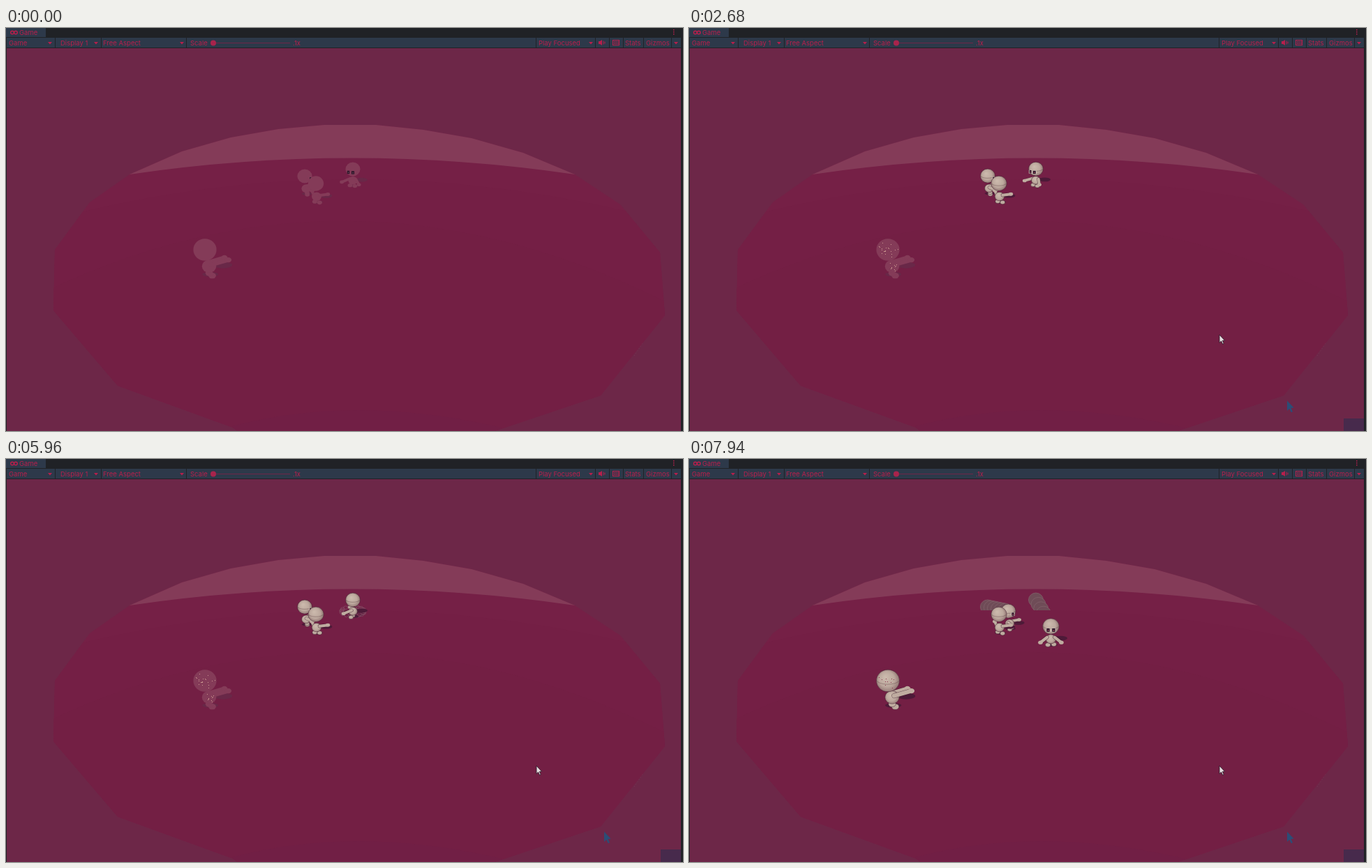
Write an HTML page with a canvas that moves like this. It is 970 by 578 pixels and loops after 8 s.

```html
<!DOCTYPE html>
<html lang="en">
<head>
<meta charset="utf-8">
<title>Game view</title>
<style>
  html, body { margin: 0; width: 100%; height: 100%; overflow: hidden; background: #6d2748; }
  canvas { display: block; }
</style>
</head>
<body>
<canvas id="stage" width="970" height="578"></canvas>
<script>
const ctx = document.getElementById('stage').getContext('2d');
const LOOP = 8000, WALK_START = 7200, SHADED_FROM = 70;
const PINK = '#b81f4c', DARK = '#202226', BAR = '#2d394a', FLAT = '#843b58';
const { sin, cos, PI, min, max } = Math;

const random = n => { const v = sin(n * 12.9898) * 43758.5453; return v - Math.floor(v); };

// Piecewise eased interpolation through [time, value] keys.
function along(keys, t) {
  if (t <= keys[0][0]) return keys[0][1];
  for (let i = 1; i < keys.length; i++) {
    const [t0, a] = keys[i - 1], [t1, b] = keys[i];
    if (t <= t1) { const u = (t - t0) / (t1 - t0); return a + (b - a) * u * u * (3 - 2 * u); }
  }
  return keys[keys.length - 1][1];
}

function rect(x, y, w, h, color) { ctx.fillStyle = color; ctx.fillRect(x, y, w, h); }

function polygon(points, color) {
  ctx.beginPath();
  points.forEach(([x, y]) => ctx.lineTo(x, y));
  ctx.closePath();
  ctx.fillStyle = color;
  ctx.fill();
}

function oval(x, y, rx, ry, fill, outline) {
  ctx.beginPath();
  ctx.ellipse(x, y, rx, ry, 0, 0, 2 * PI);
  if (fill) { ctx.fillStyle = fill; ctx.fill(); }
  if (outline) { ctx.strokeStyle = outline; ctx.lineWidth = 0.7; ctx.stroke(); }
}

function line(x0, y0, x1, y1, width, color) {
  ctx.beginPath();
  ctx.moveTo(x0, y0);
  ctx.lineTo(x1, y1);
  ctx.lineWidth = width;
  ctx.strokeStyle = color;
  ctx.stroke();
}

function label(text, x, y, color = PINK, font = '9.5px Inter, sans-serif') {
  ctx.font = font;
  ctx.fillStyle = color;
  ctx.fillText(text, x, y);
}

function drawToolbar() {
  rect(0, 0, 970, 29, DARK);
  rect(0, 0, 57, 13, BAR);
  rect(1, 14, 966, 14, BAR);
  for (const x of [70, 136, 258, 759, 844, 864, 884, 913, 953]) rect(x, 14, 1, 14, DARK);
  for (const x of [63, 129, 252, 838, 960]) polygon([[x - 3, 20], [x + 3, 20], [x, 23.5]], PINK);

  ctx.lineWidth = 1.4;
  ctx.strokeStyle = PINK;
  for (const x of [9, 14]) { ctx.beginPath(); ctx.arc(x, 6.5, 2.3, 0, 2 * PI); ctx.stroke(); }
  label('Game', 19, 10);
  label('Game', 4, 24.5);
  label('Display 1', 78, 24.5);
  label('Free Aspect', 139, 24.5);
  label('Scale', 264, 24.5);
  line(297, 21.5, 407, 21.5, 1, '#6e2648');
  oval(297, 21.5, 4, 4, '#a8244c');
  label('.1x', 411, 24.5);
  label('Play Focused', 763, 24.5);
  label('Stats', 887, 24.5);
  label('Gizmos', 917, 24.5);
  for (const y of [2, 5, 8]) rect(956, y, 1.5, 1.5, PINK);

  polygon([[849, 19], [851, 19], [854, 17], [854, 25], [851, 23], [849, 23]], PINK);
  line(856, 18.5, 856, 23.5, 1, PINK);
  line(858, 19.5, 858, 22.5, 1, PINK);
  ctx.lineWidth = 1;
  ctx.strokeRect(869.5, 17.5, 9, 7);
  for (let i = 0; i < 6; i++) rect(871 + i % 3 * 2.5, 19 + (i > 2) * 2.5, 1.5, 1.5, PINK);
}

function drawDome() {
  rect(0, 29, 970, 549, '#6d2748');
  const rim = [[177, 210], [252, 177], [322, 157], [390, 145], [456, 139], [530, 139],
    [598, 146], [667, 158], [741, 179], [815, 210]];
  const floor = [[880, 253], [937, 322], [944, 412], [852, 527], [718, 572],
    [700, 578], [332, 578], [325, 573], [160, 513], [68, 405], [70, 318], [120, 250]];
  polygon([...rim, ...floor], '#752046');
  polygon(rim, FLAT);

  ctx.save();
  ctx.beginPath();
  [...rim, ...floor].forEach(([x, y]) => ctx.lineTo(x, y));
  ctx.clip();
  const band = (left, peak, right, color) => {
    ctx.beginPath();
    ctx.moveTo(left[0], 578);
    ctx.lineTo(left[0], left[1]);
    ctx.quadraticCurveTo(495, 2 * peak - (left[1] + right[1]) / 2, right[0], right[1]);
    ctx.lineTo(right[0], 578);
    ctx.fillStyle = color;
    ctx.fill();
  };
  band([177, 210], 186.5, [815, 210], '#752046');
  band([60, 276], 217, [944, 276], '#741f45');
  band([60, 376], 277, [944, 392], '#731f44');
  band([300, 578], 548, [730, 578], '#711f45');
  ctx.restore();

  ctx.setLineDash([1, 3]);
  line(900, 470, 912, 452, 0.6, '#85435f');
  ctx.setLineDash([]);
  rect(0, 29, 1, 549, DARK);
  rect(967, 29, 3, 549, DARK);
}

// Yaw 0 faces the viewer, positive turns toward the right of the screen.
function armLine(d, side) {
  const turn = d.yaw + side * d.spread;
  const x = d.x + d.lean + side * 0.45 * d.r * cos(d.yaw);
  const y = d.y + (d.stature - 0.22) * d.r - side * 0.1 * d.r * sin(d.yaw);
  return {
    x, y,
    handX: x + d.reach * d.r * sin(turn),
    handY: y + d.reach * d.r * (0.45 * cos(turn) + d.drop),
    inFront: -side * sin(d.yaw) + 0.3 * cos(turn) > 0
  };
}

function drawArm(d, side, skin, edge) {
  const a = armLine(d, side);
  ctx.lineCap = 'round';
  if (edge) line(a.x, a.y, a.handX, a.handY, 0.36 * d.r + 1, edge);
  line(a.x, a.y, a.handX, a.handY, 0.36 * d.r, skin);
  ctx.lineCap = 'butt';
  oval(a.handX, a.handY, 0.28 * d.r, 0.22 * d.r, skin);
}

function drawEyes(d) {
  for (const side of [-1, 1]) {
    const a = d.yaw + side * 0.4, facing = cos(a);
    if (facing < 0.25) continue;
    const w = d.r * (0.16 + 0.24 * facing), h = 0.42 * d.r;
    const x = d.x + 0.86 * d.r * sin(a) - w / 2, y = d.y + d.r * (0.1 + 0.16 * facing);
    if (!d.flat) rect(x - 0.8, y - 0.3, w + 1.6, h + 0.6, '#dccbc2');
    rect(x, y, w, h, '#2b1729');
    rect(x + w * 0.35, y + h * 0.4, w * 0.35, h * 0.35, d.flat ? '#6d4058' : '#a8475f');
  }
}

function drawDoll(d) {
  const { x, y, r, flat } = d;
  const edge = flat ? null : 'rgba(58,25,42,.65)';
  const bodyX = x + d.lean, bodyY = y + d.stature * r, feetY = y + (d.stature + 0.7) * r;
  const shade = (cx, cy, size) => {
    if (flat) return FLAT;
    const g = ctx.createRadialGradient(cx - 0.25 * size, cy - 0.35 * size, 0, cx, cy, size * 1.1);
    g.addColorStop(0, '#cdbbae');
    g.addColorStop(0.6, '#bca89d');
    g.addColorStop(1, '#8a6c6b');
    return g;
  };
  const limb = flat ? FLAT : '#bfaca0';
  const shadow = flat ? '#692848' : '#4d1a38';

  oval(bodyX + 1.2 * r, feetY - 0.8 * r, 0.8 * r, 0.28 * r, shadow);
  oval(bodyX + 0.1 * r, feetY, 0.7 * r, 0.2 * r, shadow);
  for (const side of [-1, 1]) if (!armLine(d, side).inFront) drawArm(d, side, limb, edge);
  for (const side of [-1, 1]) {
    const lift = max(0, side * d.step) * 0.16 * r;
    oval(bodyX + r * (side * 0.36 * cos(d.yaw) + 0.15 * sin(d.yaw)),
      feetY - lift - side * 0.12 * r * sin(d.yaw), 0.32 * r, 0.25 * r, limb, edge);
  }
  oval(bodyX, bodyY, 0.62 * r, 0.56 * r, shade(bodyX, bodyY, 0.62 * r), edge);
  for (const side of [-1, 1]) if (armLine(d, side).inFront) drawArm(d, side, limb, edge);
  oval(x, y, r, 0.95 * r, shade(x, y, r), edge);
  if (!flat) {
    ctx.beginPath();
    ctx.ellipse(x, y - 0.05 * r, 0.96 * r, 0.36 * r, 0, 0.1, PI - 0.1);
    ctx.lineWidth = 0.7;
    ctx.strokeStyle = 'rgba(80,50,55,.5)';
    ctx.stroke();
  }
  drawEyes(d);
}

function drawSpecks(d, count, color, bodyToo) {
  for (let i = 0; i < count; i++) {
    const onBody = bodyToo && i % 3 === 0;
    const a = random(i + 1) * 2 * PI, q = Math.sqrt(random(i + 60)) * 0.9 * d.r * (onBody ? 0.6 : 1);
    rect(Math.round(d.x + (onBody ? d.lean : 0) + q * cos(a)),
      Math.round(d.y + (onBody ? d.stature * d.r : 0) + q * sin(a)), 1, 1, color);
  }
}

// Leftover arm outlines at the angles the turning doll has passed.
function drawTurnTrail(d) {
  for (let yaw = -0.9; yaw < d.yaw - 0.4; yaw += 0.42)
    for (const side of [-1, 1]) {
      const a = armLine({ ...d, yaw }, side);
      line(a.x, a.y + 3, a.handX, a.handY + 3, 1.2, '#5c2141');
      oval(a.handX, a.handY, 3, 2.4, null, '#865267');
    }
}

function drawWalkTrail(x, y, r, dx, dy, walk) {
  ctx.save();
  ctx.beginPath();
  ctx.rect(400, 180, 140, 37);
  ctx.clip();
  for (let k = 0; k < walk; k += 0.17)
    oval(x + dx * k, y + dy * k, r, 0.95 * r, '#6f4c57', '#85636c');
  ctx.restore();
}

function drawPointer(x, y, scale, fill, outline) {
  ctx.save();
  ctx.translate(x, y);
  ctx.scale(scale, scale);
  polygon([[0, 0], [0, 12], [2.7, 9.6], [4.8, 14], [6.6, 13.1], [4.6, 8.8], [8, 8.6]], fill);
  if (outline) { ctx.strokeStyle = outline; ctx.lineWidth = 0.9; ctx.stroke(); }
  ctx.restore();
}

const yawKeys = [[0, -0.4], [900, -0.3], [1860, -0.4], [3510, -0.9], [4170, 0.7],
  [4700, 0.85], [5960, 4.36], [6650, 2 * PI], [8000, 2 * PI]];
const pointerX = [[1000, 958], [1330, 857], [1650, 760]];
const pointerY = [[1000, 570], [1330, 535], [1650, 451], [1950, 451], [2300, 440]];

function drawDolls(t) {
  const flat = t < SHADED_FROM;
  const walk = max(0, min(1, (t - WALK_START) / (7940 - WALK_START)));
  const step = sin(t / 170);
  const bob = flat ? 0 : sin(t / 260) * 0.5;
  const base = { lean: 1, stature: 1.68, spread: 0.75, reach: 1.2, drop: 0, flat, step };

  const spinner = { ...base, x: 497 + 21.5 * walk, y: 202.5 + 37.5 * walk + bob * (1 - walk), r: 10.5 + 1.3 * walk,
    lean: 0, stature: 1.55, drop: 0.2, yaw: along(yawKeys, t), step: walk ? step : 0 };
  const rear = { ...base, x: 428 + 29.5 * walk, y: 212.5 + 6 * walk + bob, r: 10.6, lean: 2,
    yaw: 1.6 - 0.4 * walk };
  const front = { ...base, x: 444, y: 223 + bob * 0.6, r: 11.2, yaw: 2.6, reach: 1.1 };
  const near = { ...base, x: 285, y: 318, r: 16.6, lean: 6, stature: 1.43, spread: 0, reach: 1.6,
    drop: -0.1, yaw: 1.95, flat: t < WALK_START, step: 0 };

  if (walk) {
    drawWalkTrail(497, 202, 10.5, 21.5, 37.5, walk);
    drawWalkTrail(428, 212, 10.6, 29.5, 6, walk);
  } else if (!flat) drawTurnTrail(spinner);
  drawDoll(spinner);
  drawDoll(rear);
  drawDoll(front);
  drawDoll(near);
  if (!near.flat) drawSpecks(near, 10, '#8c3450', false);
  else if (!flat) drawSpecks(near, 30, '#c9968f', true);
}

function drawOverlay(t) {
  if (t < 1000) return;
  if (t < 2100) {
    rect(939, 561, 28, 17, '#85808c');
    rect(940, 562, 27, 16, '#bcb5c0');
    label('Stop', 944, 577, '#25232b', '10.5px "Open Sans", sans-serif');
  } else rect(938, 560, 29, 18, '#472a4c');
  if (t > 1330) drawPointer(857, 534.5, 1.2, '#2c4d76');
  drawPointer(along(pointerX, t), along(pointerY, t), 0.95, '#e6dde0', '#2a1826');
}

function frame() {
  const t = performance.now() % LOOP;
  drawDome();
  drawToolbar();
  drawDolls(t);
  drawOverlay(t);
  requestAnimationFrame(frame);
}
frame();
</script>
</body>
</html>
```
